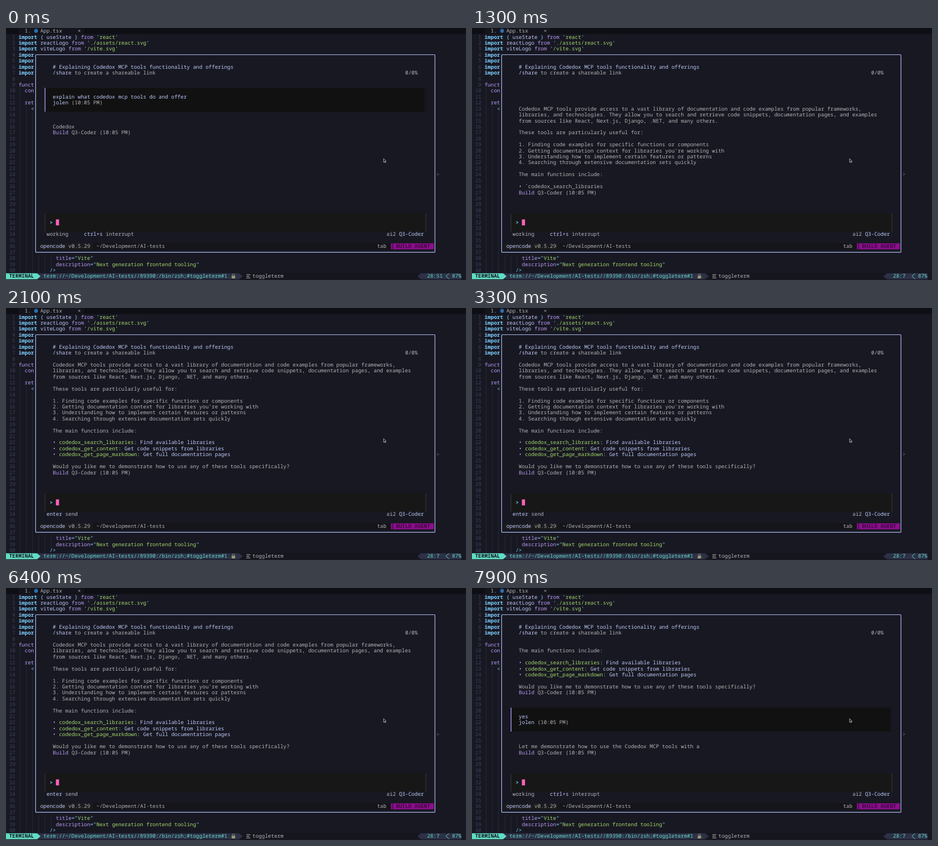
Recreate the animation shown at these times as an HTML page. Size 800 by 439 pixels, loop 8000 ms.

```html
<!DOCTYPE html>
<html lang="en">
<head>
<meta charset="utf-8">
<title>Terminal session</title>
<style>
  html, body { margin: 0; width: 100%; height: 100%; overflow: hidden; background: #181822; }
  svg { display: block; width: 800px; height: 439px; }
  text {
    font: 9.04px "Noto Sans Mono", "DejaVu Sans Mono", monospace;
    white-space: pre;
    text-rendering: geometricPrecision;
  }
  .bold { font-weight: 700; }
</style>
</head>
<body>
<svg viewBox="0 0 800 439" xmlns="http://www.w3.org/2000/svg">
  <g id="editor"></g>
  <g id="popup"></g>
  <g id="live"></g>
  <path d="M656.7 227.6v6.2l1.5-1.3 1 2.2 1-.5-1-2.1h2z" fill="#111" stroke="#ddd" stroke-width=".7"/>
</svg>
<script>
const LOOP = 8000, CELL = 5.424, ROW = 10.42;
const C = {
  bg: '#181822', bar: '#0e0e15', num: '#3b4261', guide: '#2a2c3d',
  gray: '#b2b2b5', lav: '#bcc8f6', cyan: '#7dcfff', purple: '#b79bf4',
  green: '#a3d66c', teal: '#62dcc4', section: '#2d3147', box: '#111112'
};
const byId = id => document.getElementById(id);
const colX = col => col * CELL;
const rowY = row => row * ROW;
const escapeText = s => s.replace(/&/g, '&amp;').replace(/</g, '&lt;');

const rect = (x, y, w, h, fill) =>
  `<rect x="${x}" y="${y}" width="${w}" height="${h}" fill="${fill}"/>`;
const path = (d, fill, extra = '') => `<path d="${d}" fill="${fill}" ${extra}/>`;

function label(row, col, color, str, bold = false) {
  return `<text x="${colX(col)}" y="${rowY(row) + 8.2}" fill="${color}"` +
    `${bold ? ' class="bold"' : ''}>${escapeText(str)}</text>`;
}

// Runs are [color, text] pairs laid end to end on the character grid.
function runs(row, col, ...parts) {
  return parts.map(([color, str]) => {
    const out = label(row, col, color, str);
    col += str.length;
    return out;
  }).join('');
}

function drawEditor() {
  let out = rect(0, 0, 800, 10.4, C.bar) + rect(22, 0, 114, 10.4, '#14141d');
  out += label(0, 6, C.gray, '1.') + label(0, 11, C.gray, 'App.tsx') + label(0, 23, C.gray, '×');
  out += '<circle cx="52.3" cy="5" r="3.4" fill="#2b6cab"/>';

  for (let n = 1; n <= 40; n++) out += label(n, 1, C.num, String(n).padStart(2));
  const guide = (col, from, to) =>
    rect(colX(col) + 2.4, rowY(from), .8, rowY(to + 1) - rowY(from), C.guide);
  out += guide(4, 10, 40) + guide(6, 13, 40) + guide(8, 14, 40);
  out += guide(10, 38, 40) + guide(12, 38, 40) + guide(14, 38, 39);

  const importLine = (row, name, file) => label(row, 4, C.cyan, 'import', true) +
    runs(row, 11, ...name, [C.purple, ' from '], [C.cyan, "'"], [C.green, file], [C.cyan, "'"]);
  out += importLine(1, [[C.cyan, '{ '], [C.lav, 'useState'], [C.cyan, ' }']], 'react');
  out += importLine(2, [[C.lav, 'reactLogo']], './assets/react.svg');
  out += importLine(3, [[C.lav, 'viteLogo']], '/vite.svg');
  for (let row = 4; row <= 7; row++) out += label(row, 4, C.cyan, 'impor', true);
  out += label(9, 4, C.purple, 'funct') + label(10, 6, C.purple, 'con') +
    label(12, 6, C.purple, 'ret') + label(13, 8, C.cyan, '<');

  const attr = (row, name, value) =>
    runs(row, 16, [C.purple, name], [C.cyan, '="'], [C.green, value], [C.cyan, '"']);
  out += attr(38, 'title', 'Vite') + attr(39, 'description', 'Next generation frontend tooling');
  out += label(40, 14, C.cyan, '/>') + label(24, 138, '#62677f', '>');

  const top = rowY(41), mid = top + ROW / 2, end = top + ROW;
  out += rect(0, top, 792, ROW, '#15151e');
  out += path(`M54 ${top}H405L412 ${mid} 405 ${end}H54z`, C.section);
  out += path(`M0 ${top}H54L60 ${mid} 54 ${end}H0z`, C.teal);
  out += label(41, 1, '#15161e', 'TERMINAL', true);
  out += label(41, 12, C.teal, 'term://~/Development/AI-tests//89390:/bin/zsh;#toggleterm#1');
  out += rect(392.5, mid - .8, 6, 4.6, '#9b9a72');
  out += path(`M393.8 ${mid - .8}v-1.4a1.7 1.7 0 0 1 3.4 0v1.4`, 'none', 'stroke="#9b9a72"');
  for (let i = 0; i < 3; i++) out += rect(418, mid - 3.2 + i * 2.8, i === 1 ? 5.5 : 7, 1, C.gray);
  out += label(41, 79, C.gray, 'toggleterm');
  out += path(`M792 ${top}H722L715.5 ${mid} 722 ${end}H792z`, C.section);
  out += path(`M770.5 ${top + .6}L765 ${mid} 770.5 ${end - .6}`, 'none', `stroke="${C.teal}" stroke-width=".9"`);
  out += label(41, 143, C.teal, '87%');
  return out;
}

function drawPopup() {
  let out = rect(colX(9), rowY(4), colX(129), ROW * 34, C.bg);
  out += `<rect x="51.5" y="46.5" width="694.5" height="344.2" rx="1" fill="none" stroke="#a9b5e8" stroke-width="1.2"/>`;
  out += label(6, 15, C.lav, '# Explaining Codedox MCP tools functionality and offerings');
  out += runs(7, 15, [C.lav, '/share'], [C.gray, ' to create a shareable link']);
  out += label(7, 128, C.gray, '0/0%');

  out += rect(67, rowY(31), 664, ROW * 3, '#171717');
  out += rect(67, rowY(31), 1.5, ROW * 3, '#2d2d31') + rect(729.5, rowY(31), 1.5, ROW * 3, '#2d2d31');
  out += label(32, 14, C.cyan, '>', true);
  out += runs(34, 122, [C.gray, 'ai2 '], [C.lav, 'Q3-Coder']);

  out += rect(54.2, rowY(36), 97, ROW, '#1b1b1e') + rect(151.2, rowY(36), 521, ROW, '#141419');
  out += runs(36, 11, [C.lav, 'opencode'], [C.gray, ' v0.5.29']);
  out += label(36, 29, C.gray, '~/Development/AI-tests') + label(36, 119, C.gray, 'tab');
  out += rect(669.5, rowY(36), 74.5, ROW, '#8d0d8d') + rect(672, rowY(36), 1.2, ROW, '#3a0a3e');
  out += label(36, 125, '#3d0742', 'BUILD AGENT', true);
  return out;
}

const ANSWER = `Codedox MCP tools provide access to a vast library of documentation and code examples from popular frameworks,
libraries, and technologies. They allow you to search and retrieve code snippets, documentation pages, and examples
from sources like React, Next.js, Django, .NET, and many others.

These tools are particularly useful for:

1. Finding code examples for specific functions or components
2. Getting documentation context for libraries you're working with
3. Understanding how to implement certain features or patterns
4. Searching through extensive documentation sets quickly

The main functions include:

• \`codedox_search_libraries\`: Find available libraries
• \`codedox_get_content\`: Get code snippets from libraries
• \`codedox_get_page_markdown\`: Get full documentation pages

Would you like me to demonstrate how to use any of these tools specifically?`;
const REPLY = 'Let me demonstrate how to use the Codedox MCP tools with a';

const after = (str, part) => str.indexOf(part) + part.length;
const answerKeys = [[0, 7], [900, after(ANSWER, "you're")], [1600, after(ANSWER, '_markdown')], [1900, ANSWER.length]];
const replyKeys = [[7700, 6], [7900, REPLY.length]];
const SEND = 7300, TYPING = [6900, 7000, 7100];

function keyed(keys, t) {
  if (t <= keys[0][0]) return keys[0][1];
  for (let i = 1; i < keys.length; i++) {
    const [t0, v0] = keys[i - 1], [t1, v1] = keys[i];
    if (t <= t1) return Math.round(v0 + (v1 - v0) * (t - t0) / (t1 - t0));
  }
  return keys[keys.length - 1][1];
}

// Text arrives in whole words.
function streamed(str, keys, t) {
  let n = keyed(keys, t);
  while (n < str.length && /[\w']/.test(str[n])) n++;
  return str.slice(0, n).trimEnd().split('\n');
}

function answerLine(row, line) {
  const item = line.match(/^• `(.+)`(.*)$/);
  return item
    ? runs(row, 15, [C.purple, '• '], [C.green, item[1]], [C.lav, item[2]])
    : label(row, 15, C.gray, line);
}

const signature = row => runs(row, 15, [C.purple, 'Build'], [C.gray, ' Q3-Coder (10:05 PM)']);

function userBox(row, str) {
  return rect(69, rowY(row), 658.5, ROW * 4, C.box) +
    rect(67, rowY(row), 1.7, ROW * 4, '#8a7cc2') + rect(727.5, rowY(row), 3, ROW * 4, '#15151a') +
    label(row + 1, 15, C.lav, str) + runs(row + 2, 15, [C.lav, 'jolen'], [C.gray, ' (10:05 PM)']);
}

function drawChat(t) {
  const FIRST = 9, LAST = 27;
  const items = [];
  let next = FIRST + 1;
  const add = (height, draw) => { items.push({ row: next, height, draw }); next += height; };
  const addAnswer = lines => {
    lines.forEach(line => add(1, row => answerLine(row, line)));
    add(1, signature);
  };

  add(4, row => userBox(row, 'explain what codedox mcp tools do and offer'));
  next += 2;
  addAnswer(streamed(ANSWER, answerKeys, t));
  if (t >= SEND) {
    next += 2;
    add(4, row => userBox(row, 'yes'));
  }
  if (t >= replyKeys[0][0]) {
    next += 2;
    addAnswer(streamed(REPLY, replyKeys, t));
  }
  const shift = Math.max(0, next - 1 - LAST);
  return items.filter(({ row, height }) => row - shift + height > FIRST && row - shift >= FIRST)
    .map(({ row, draw }) => draw(row - shift)).join('');
}

function drawLive(t) {
  const busy = t < 1900 || t >= SEND;
  const typed = t < SEND ? 'yes'.slice(0, TYPING.filter(at => t >= at).length) : '';
  let out = drawChat(t);
  out += label(32, 16, C.lav, typed);
  out += rect(colX(16 + typed.length), rowY(32), CELL, ROW, '#ff62bd');
  if (busy) {
    const dots = Math.floor((t + 200) * 3 / 1000) % 4;
    out += label(34, 13, C.gray, 'working' + '.'.repeat(dots));
    out += runs(34, 25, [C.lav, 'ctrl+s'], [C.gray, ' interrupt']);
  } else {
    out += runs(34, 13, [C.lav, 'enter'], [C.gray, ' send']);
  }
  return out + label(41, 135, C.teal, t < 100 ? '28:51' : '28:7');
}

byId('editor').innerHTML = drawEditor();
byId('popup').innerHTML = drawPopup();

let shown = -1;
const start = performance.now();
function tick() {
  const t = Math.floor(((performance.now() - start) % LOOP) / 100) * 100;
  if (t !== shown) byId('live').innerHTML = drawLive(shown = t);
  requestAnimationFrame(tick);
}
tick();
</script>
</body>
</html>
```
